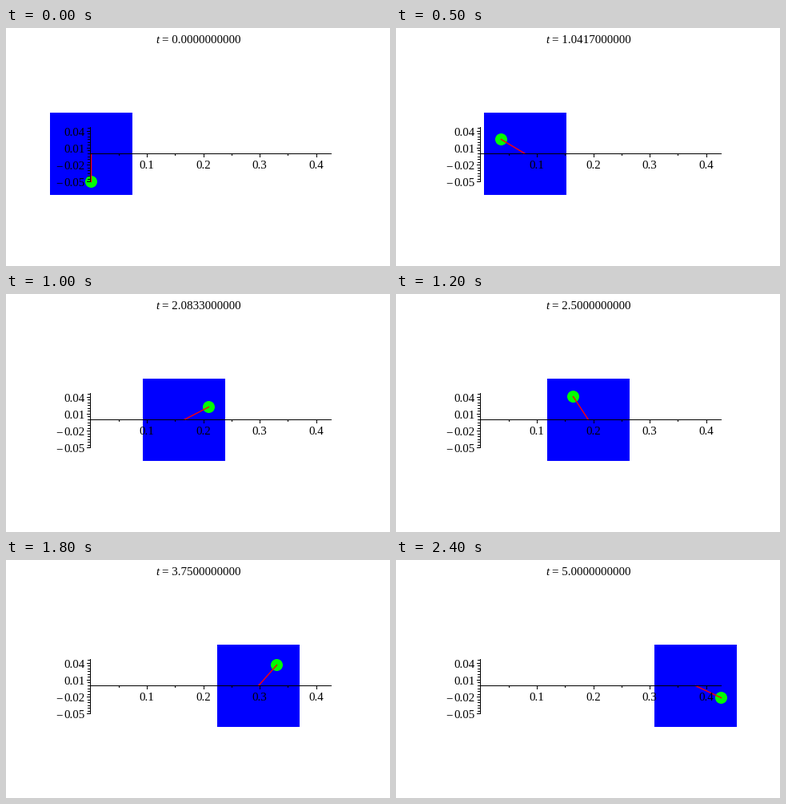
Recreate the animation shown at these times as a matplotlib script. Size 480x298 px, loop 2.5 s.

```python
import math

import matplotlib.pyplot as plt
from matplotlib.animation import FuncAnimation
from matplotlib.patches import Circle, Rectangle

W, H, DPI = 480, 298, 100
FRAMES, INTERVAL, T_END = 25, 100, 5.0
PX = 72 / DPI           # points per pixel
UNIT = 705              # pixels per axis unit
X0, Y0 = 106.15, 157.5  # axis origin
BOX, ROD, BALL = 103, 35, 7.5
OMEGA = 4

fig = plt.figure(figsize=(W / DPI, H / DPI), dpi=DPI, facecolor="white")
ax = fig.add_axes([0, 0, 1, 1])
ax.set_xlim(0, W)
ax.set_ylim(H, 0)
ax.axis("off")


def snap(v):
    """Centre of the pixel that holds v."""
    return math.floor(v) + 0.5


def bar(x, y, w=1, h=1):
    """Black line covering whole pixels."""
    ax.add_patch(Rectangle((math.floor(x), math.floor(y)), w, h,
                           fc="black", ec="none", zorder=5))


def label(x, y, s, ha="left", **kw):
    return ax.text(x, y, s, ha=ha, va="baseline", family="Liberation Serif",
                   size=15 * PX, color="black", zorder=6, **kw)


def draw_axes():
    bar(105, Y0, w=302)
    for k in range(1, 9):
        x = X0 + k * 0.05 * UNIT
        major = k % 2 == 0
        bar(x, Y0, h=5 if major else 3)
        if major:
            label(snap(x) - 1, 176, f"{k * 0.05:.1f}", "center")

    bar(105, 124, h=69)
    for k in range(20):
        v = -0.05 + 0.005 * k
        y = Y0 - v * UNIT
        major = k % 6 == 0
        size = 4 if major else 3
        bar(105 - size, y, w=size)
        if major:
            base = snap(y) + 5.5
            label(98.5, base, f"{abs(v):.2f}", "right")
            if v < 0:
                label(62, base, "\u2212")


def shift(t):
    """Distance the box has travelled, in pixels."""
    a = OMEGA * t
    return 55 * t - 3 * math.sin(a) - 5.4 * math.sin(2 * a)


draw_axes()
box = ax.add_patch(Rectangle((0, 106), BOX, BOX, fc="#0000ff", ec="none", zorder=1))
ball = ax.add_patch(Circle((0, 0), BALL, fc="#00ff00", ec="none", zorder=2))
rod, = ax.plot([], [], color="#ff0000", lw=1.4 * PX, zorder=3, snap=False)
label(187.8, 19, "t", style="italic")
clock = label(195, 19, "")


def update(i):
    t = T_END * i / (FRAMES - 1)
    d = shift(t)
    left = 55 + math.floor(d)
    pivot = left + BOX / 2
    bx = snap(X0 + d + ROD * math.sin(OMEGA * t))
    by = snap(Y0 + 0.4 + ROD * math.cos(OMEGA * t))
    box.set_x(left)
    ball.center = (bx, by)
    rod.set_data([pivot, bx], [Y0, by])
    clock.set_text(f"= {float(f'{t:.5g}'):.10f}")
    return box, ball, rod, clock


anim = FuncAnimation(fig, update, frames=FRAMES, interval=INTERVAL,
                     repeat=True, repeat_delay=0, blit=False)
plt.show()
```
